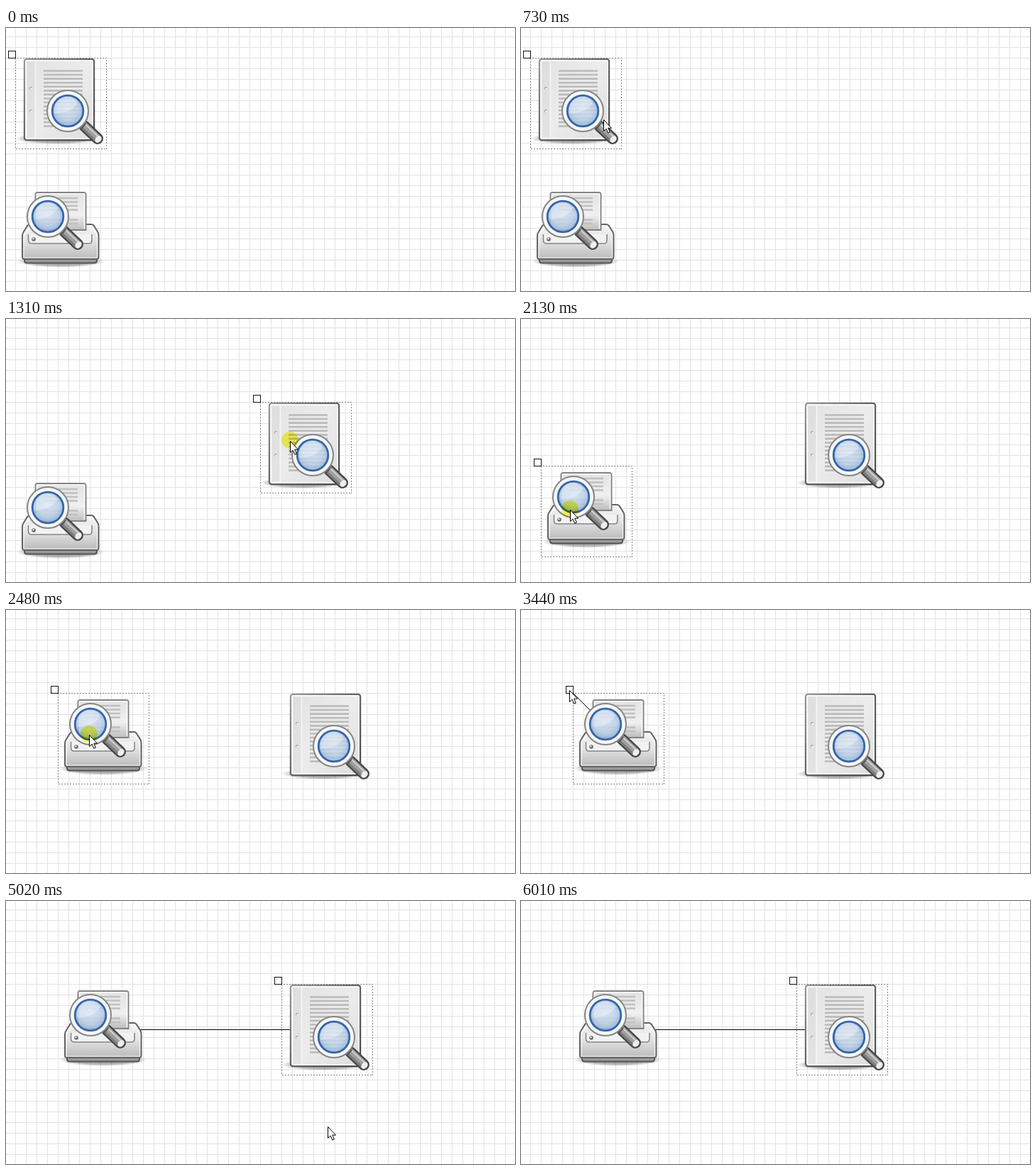
Write an HTML page that moves like this. It is 717 by 371 pixels and loops after 6710 ms.

```html
<!DOCTYPE html>
<html lang="en">
<head>
<meta charset="utf-8">
<title>Connecting nodes</title>
<style>
html, body { margin: 0; width: 100%; height: 100%; overflow: hidden; background: #fff; }
svg { display: block; }
.crisp { shape-rendering: crispEdges; }
#spot { mix-blend-mode: multiply; }
</style>
</head>
<body>
<svg width="717" height="371" viewBox="0 0 717 371">
  <defs>
    <linearGradient id="page" x1="0" y1="0" x2="1" y2="1">
      <stop offset="0" stop-color="#e2e2e2"/><stop offset=".5" stop-color="#ececec"/><stop offset="1" stop-color="#dedede"/>
    </linearGradient>
    <linearGradient id="edge" x1="0" y1="0" x2="1" y2="1">
      <stop offset="0" stop-color="#999"/><stop offset=".45" stop-color="#666"/><stop offset="1" stop-color="#484848"/>
    </linearGradient>
    <linearGradient id="sheet" x1="0" y1="0" x2="0" y2="1">
      <stop offset="0" stop-color="#e2e2e2"/><stop offset=".6" stop-color="#f0f0f0"/><stop offset="1" stop-color="#bcbcbc"/>
    </linearGradient>
    <linearGradient id="body" x1="0" y1="0" x2="0" y2="1">
      <stop offset="0" stop-color="#f4f4f4"/><stop offset=".5" stop-color="#e2e2e2"/><stop offset="1" stop-color="#bababa"/>
    </linearGradient>
    <radialGradient id="glass" cx=".5" cy=".45" r=".55">
      <stop offset="0" stop-color="#cfddee"/><stop offset=".6" stop-color="#bdd1e9"/><stop offset="1" stop-color="#8fb1da"/>
    </radialGradient>
    <radialGradient id="shade">
      <stop offset="0" stop-opacity=".45"/><stop offset=".7" stop-opacity=".3"/><stop offset="1" stop-opacity="0"/>
    </radialGradient>

    <g id="lens" stroke-linecap="round" fill="none">
      <path d="M23 21L42 39" stroke="#484848" stroke-width="16"/>
      <path d="M23 21L42 39" stroke="#a0a0a0" stroke-width="11"/>
      <path d="M26 20L43 36" stroke="#d0d0d0" stroke-width="2"/>
      <path d="M20 23.5L38 40.5" stroke="#7c7c7c" stroke-width="2.5"/>
      <path d="M23 18L19 23" stroke="#555" stroke-width="5"/>
      <ellipse cx="43" cy="40" rx="4" ry="5.3" transform="rotate(40 43 40)" fill="#eee"/>
      <circle r="22" fill="url(#glass)" opacity=".82"/>
      <path d="M-18 4A18 18 0 0 1 14 -12Q8 2 -18 4Z" fill="#fff" opacity=".3"/>
      <circle r="25.5" stroke="#f6f6f6" stroke-width="6"/>
      <circle r="29" stroke="#858585" stroke-width="2"/>
      <circle r="21.8" stroke="#3466a8" stroke-width="2.8"/>
    </g>

    <g id="doc">
      <ellipse cx="60" cy="114" rx="60" ry="8" fill="url(#shade)"/>
      <rect x="13" y="2" width="98" height="114" rx="3" fill="url(#page)" stroke="url(#edge)" stroke-width="2.4"/>
      <rect x="15" y="4" width="94" height="110" rx="1.5" fill="none" stroke="#fafafa" stroke-width="1.8"/>
      <rect x="17" y="6" width="10" height="106" fill="#d8d8d8" opacity=".45"/>
      <path d="M28.5 5V113" stroke="#f5f5f5" stroke-width="1.5"/>
      <g fill="#b0b0b0"><circle cx="22" cy="43" r="2.2"/><circle cx="22" cy="75" r="2.2"/></g>
      <g fill="#fff"><circle cx="22.6" cy="43.7" r="1.3"/><circle cx="22.6" cy="75.7" r="1.3"/></g>
      <path id="text" stroke="#bbb" stroke-width="2.6"/>
      <use href="#lens" x="74" y="75"/>
    </g>

    <g id="printer">
      <ellipse cx="64" cy="107" rx="62" ry="9" fill="url(#shade)"/>
      <path d="M13 100H115V106Q115 109.5 111 109.5H17Q13 109.5 13 106Z" fill="#9a9a9a" stroke="#555" stroke-width="2"/>
      <path d="M21 55H107Q110 55 111.5 58L116.5 66Q117.5 68 117.5 71V101Q117.5 104 114.5 104H13Q10 104 10 101V71Q10 68 11.5 66L16.5 58Q18 55 21 55Z" fill="url(#body)" stroke="#636363" stroke-width="2"/>
      <path d="M21 57H107L115.5 70V102H12V70Z" fill="none" stroke="#fff" stroke-width="1.2" opacity=".75"/>
      <path d="M18.500 69V77Q18.500 82 23 82H104Q108 82 108 77V69" fill="#f2f2f2" stroke="#858585" stroke-width="1.6"/>
      <circle cx="26" cy="76" r="2.8" fill="#666"/><circle cx="25.5" cy="75.3" r="1.3" fill="#ddd"/>
      <path d="M28.5 63V13Q28.5 10 31.5 10H96.5Q99.5 10 99.5 13V63Z" fill="url(#sheet)" stroke="#858585" stroke-width="2"/>
      <path d="M30.5 61V12H97.5V61" fill="none" stroke="#fafafa" stroke-width="1.5"/>
      <path d="M40 18H88M40 23.5H88M40 29H88M40 34.5H88M40 48.5H88M40 54H88" stroke="#c0c0c0" stroke-width="2.4"/>
      <use href="#lens" x="46" y="44"/>
    </g>
  </defs>

  <path id="grid" class="crisp" stroke="#e2e2e2"/>
  <line id="link" stroke="#000"/>
  <use id="docNode" href="#doc"/>
  <use id="printNode" href="#printer"/>
  <g id="frame" class="crisp" fill="none">
    <rect x=".5" y=".5" width="128" height="128" stroke="#858585" stroke-dasharray="2 2" stroke-dashoffset="2"/>
    <rect x="-9.5" y="-9.5" width="10" height="10" fill="#fff" stroke="#111"/>
  </g>
  <circle id="spot" r="12" cy="-1" fill="#fbf84a" opacity=".9"/>
  <path id="arrow" d="M.5 .5V16.5L4.2 13.2 6.7 19.2 9.3 18.1 6.8 12.2H11.5Z" fill="#fff" stroke="#000"/>
</svg>
<script>
const LOOP = 6710, STEP = 15, HALF = 64;
const ENTER = 200, LEAVE = 6005, PICK = 1990, PULL = 3420, JOIN = 4770;
const $ = id => document.getElementById(id);

// pointer moves: start time, end time, x and y reached
const entry = [613, 364];
const moves = [
  [ENTER, 860, 61, 103],
  [1025, 1374, 432, 178],
  [1610, 1970, 57, 281],
  [2060, 2270, 102, 236],
  [2290, 2480, 117, 176],
  [2590, 2920, 65, 109],
  [3205, 3220, 68, 113],
  [3450, 3880, 463, 203],
  [3900, 4080, 510, 212],
  [4100, 4315, 446, 168],
  [JOIN, 5140, 455, 366]
];
const docDrag = [860, 1560], printDrag = [PICK, 2570];
const presses = [docDrag, printDrag, [3220, PULL], [4660, JOIN]];

const ease = u => u * u * (3 - 2 * u);
const snap = v => Math.round(v / STEP) * STEP;

function pointer(t) {
  let [x, y] = entry;
  for (const [from, to, tx, ty] of moves) {
    if (t < from) break;
    const k = ease(Math.min(1, (t - from) / (to - from)));
    x += (tx - x) * k;
    y += (ty - y) * k;
  }
  return [x, y];
}

// a node follows the pointer while pressed, held to the grid
function dragged(t, [from, to], start) {
  if (t < from) return start;
  const grab = pointer(from), now = pointer(Math.min(t, to));
  return start.map((v, i) => v + snap(now[i] - grab[i]));
}

const place = (el, [x, y]) => el.setAttribute("transform", `translate(${x} ${y})`);
const show = (el, on) => el.setAttribute("visibility", on ? "visible" : "hidden");

function draw(t) {
  const doc = dragged(t, docDrag, [13, 42]);
  const printer = dragged(t, printDrag, [13, 222]);
  const tip = pointer(t).map(Math.round);
  const linked = t >= JOIN;

  place($("docNode"), doc);
  place($("printNode"), printer);
  place($("frame"), t >= PICK && !linked ? printer : doc);
  place($("arrow"), tip);
  place($("spot"), tip);
  show($("arrow"), t >= ENTER && t < LEAVE);
  show($("spot"), presses.some(([a, b]) => t >= a && t < b));

  const link = $("link");
  const end = linked ? doc.map(v => v + HALF) : [tip[0], tip[1] - 1];
  show(link, t >= PULL);
  link.setAttribute("x1", printer[0] + HALF + .5);
  link.setAttribute("y1", printer[1] + HALF + .5);
  link.setAttribute("x2", end[0] + .5);
  link.setAttribute("y2", end[1] + .5);
}

let grid = "", text = "";
for (let x = 13.5; x < 717; x += STEP) grid += `M${x} 0V371`;
for (let y = 12.5; y < 371; y += STEP) grid += `M0 ${y}H717`;
for (let i = 0; i < 15; i++) text += `M40 ${18.5 + i * 5.57}H95`;
$("grid").setAttribute("d", grid);
$("text").setAttribute("d", text);

const began = performance.now();
function tick() {
  draw((performance.now() - began) % LOOP);
  requestAnimationFrame(tick);
}
tick();
</script>
</body>
</html>
```
